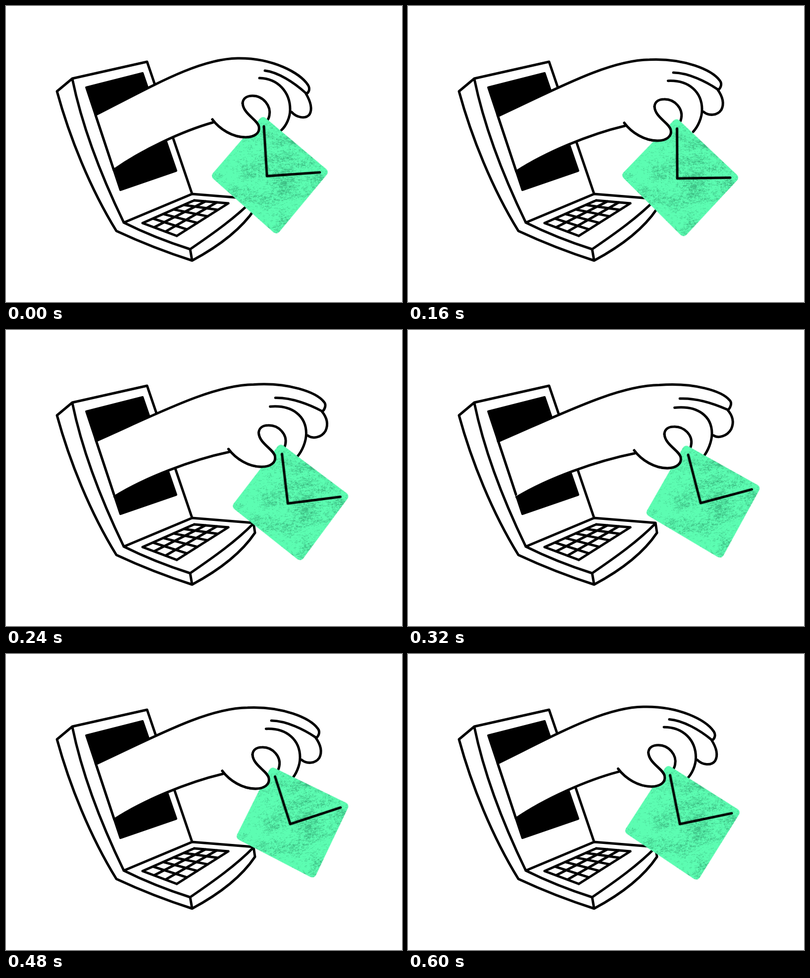
Animation of 800x600 px, one loop 640 ms. Source, as an HTML page with a canvas:

```html
<!DOCTYPE html>
<html lang="en">
<head>
<meta charset="utf-8">
<title>Mail from a laptop</title>
<style>
html, body { margin: 0; height: 100%; overflow: hidden; background: #fff; }
canvas { display: block; }
</style>
</head>
<body>
<canvas id="stage" width="800" height="600"></canvas>
<script>
const ctx = document.getElementById('stage').getContext('2d');
const LOOP = 640, STEP = 80;
const clamp = v => Math.max(0, Math.min(1, v));
const mix = (a, b, t) => a + (b - a) * t;

// The arm at rest: each curve is a start point followed by cubic segments.
const outline = [
  // upper edge to the fingertip
  [182,220, 300,160,390,107,468,106, 540,105,594,136,610,160, 615,168,612,175,607,178],
  // second finger
  [523,131, 550,134,583,156,605,176, 617,196,619,210,613,220, 605,230,587,226,577,215],
  // index finger
  [512,146, 550,147,574,175,574,210, 574,226,566,243,556,252],
  // lower edge back to the screen
  [418,236, 355,254,275,292,218,332]
];
const thumb = [417,230, 432,250,458,266,484,266, 503,266,513,257,511,245, 509,231,479,219,478,197,
  479,186,488,182,498,182, 520,182,536,203,532,222, 531,228,528,233,524,237];

// Moves a resting point with the reach: the forearm stretches,
// the fingers lift the further out they are, the knuckles lag behind.
function reachPoint(x, y, reach) {
  const stretch = clamp((x - 170) / 240) ** 2;
  const lag = Math.exp(-((x - 518) ** 2 + (y - 138) ** 2) / 900);
  const drop = 14 * clamp((x - 20) / 400) * clamp((y - 70) / 90);
  const lift = .0026 * Math.max(0, x - 500) ** 2;
  return [x + reach * (40 * stretch - 15 * lag), y + reach * (drop - lift)];
}
function reachCurve(p, reach) {
  const out = [];
  for (let i = 0; i < p.length; i += 2) out.push(...reachPoint(p[i], p[i + 1], reach));
  return out;
}

function addCurve(path, p, join = 'moveTo') {
  path[join](p[0], p[1]);
  for (let i = 2; i < p.length; i += 6) path.bezierCurveTo(...p.slice(i, i + 6));
  return path;
}
const curve = p => addCurve(new Path2D(), p);

function pen(c, width, color = '#000') {
  c.lineWidth = width;
  c.strokeStyle = color;
  c.lineCap = c.lineJoin = 'round';
}

// Seeded value noise.
function hash(x, y) {
  const s = Math.sin(x * 127.1 + y * 311.7) * 43758.5453;
  return s - Math.floor(s);
}
function noise(x, y) {
  const i = Math.floor(x), j = Math.floor(y);
  const ease = t => t * t * (3 - 2 * t);
  const u = ease(x - i), v = ease(y - j);
  return mix(mix(hash(i, j), hash(i + 1, j), u), mix(hash(i, j + 1), hash(i + 1, j + 1), u), v);
}

const OX = 125, OY = 30;
function makeEnvelope() {
  const sheet = document.createElement('canvas');
  sheet.width = sheet.height = 265;
  const c = sheet.getContext('2d');
  c.translate(OX, OY);
  const paper = new Path2D('M-1-11L115 100L12 210L-103 94Z');
  pen(c, 16, '#5cfdb2');
  c.fillStyle = c.strokeStyle;
  c.fill(paper);
  c.stroke(paper);

  c.globalCompositeOperation = 'source-atop';
  for (let y = -20; y < 222; y++) {
    for (let x = -114; x < 128; x++) {
      const middle = Math.exp(-((x - 40) ** 2 + (y - 75) ** 2) / 8000);
      const grain = .35 * noise(x / 4 + 50, y / 2) + .3 * noise(x / 36 + 9, y / 16 + 30)
        + .35 * hash(x + 400, y + 700) + .1 * middle;
      if (grain < .61) continue;
      c.fillStyle = `rgba(8,80,52,${Math.min(.4, .12 + (grain - .61) * 1.2)})`;
      c.fillRect(x, y, 1, 1);
    }
  }
  c.globalCompositeOperation = 'source-over';
  pen(c, 5);
  c.stroke(new Path2D('M0 0V101L107 100'));
  return sheet;
}
const envelope = makeEnvelope();

const laptop = new Path2D(`M103 173L134 147L285 113L376 381L500 391L503 411
  C475 453 430 487 376 516Q298 491 223 456C170 370 128 265 103 173Z
  M134 148C155 250 195 350 238 439L376 381
  M238 439Q300 470 372 493L376 516M372 493C420 460 465 428 500 392`);
const screen = new Path2D('M162 165L276 136L344 334L231 373Z');
const screenEdge = new Path2D('M181 221L218 333');

function makeKeys(columns, rows) {
  const keys = new Path2D();
  const corner = (u, v) => [276 + 69 * u + 104 * v, 440 + 26 * u - 46 * v - 20 * u * v];
  const line = (a, b) => { keys.moveTo(...a); keys.lineTo(...b); };
  for (let i = 0; i <= columns; i++) line(corner(i / columns, 0), corner(i / columns, 1));
  for (let i = 0; i <= rows; i++) line(corner(0, i / rows), corner(1, i / rows));
  return keys;
}
const keys = makeKeys(3, 5);

function drawLaptop() {
  pen(ctx, 5);
  ctx.stroke(laptop);
  ctx.stroke(keys);
  pen(ctx, 4);
  ctx.fillStyle = '#000';
  ctx.fill(screen);
  ctx.stroke(screen);
}

function drawArm(reach) {
  const parts = outline.map(p => reachCurve(p, reach));
  const body = new Path2D();
  parts.forEach((p, i) => addCurve(body, p, i ? 'lineTo' : 'moveTo'));
  ctx.fillStyle = '#fff';
  ctx.fill(body);
  pen(ctx, 5);
  parts.forEach(p => ctx.stroke(curve(p)));
  ctx.stroke(screenEdge);
}

function drawEnvelope(reach, tilt) {
  ctx.save();
  ctx.translate(521 + 45 * reach, 244 + 9 * reach);
  ctx.rotate(tilt * Math.PI / 180);
  ctx.drawImage(envelope, -OX, -OY);
  ctx.restore();
}

function draw(now) {
  const t = Math.floor(now / STEP) * STEP % LOOP / LOOP;
  const phase = t * 2 * Math.PI;
  const wave = (1 - Math.cos(phase)) / 2, ramp = 1 - Math.abs(1 - 2 * t);
  const reach = mix(wave, ramp, .4);
  // The paper swings a little later than the hand.
  const tilt = 10.3 * Math.cos(phase - 1.01) - 9;

  ctx.fillStyle = '#fff';
  ctx.fillRect(0, 0, 800, 600);
  drawLaptop();
  drawArm(reach);
  const thumbLine = reachCurve(thumb, reach);
  ctx.stroke(curve(thumbLine));
  drawEnvelope(reach, tilt);
  // The thumb closes over the paper.
  const grip = curve(thumbLine.slice(0, 20));
  ctx.fillStyle = '#fff';
  ctx.fill(grip);
  ctx.stroke(grip);
}

const start = performance.now();
function tick() {
  draw(performance.now() - start);
  requestAnimationFrame(tick);
}
tick();
</script>
</body>
</html>
```
